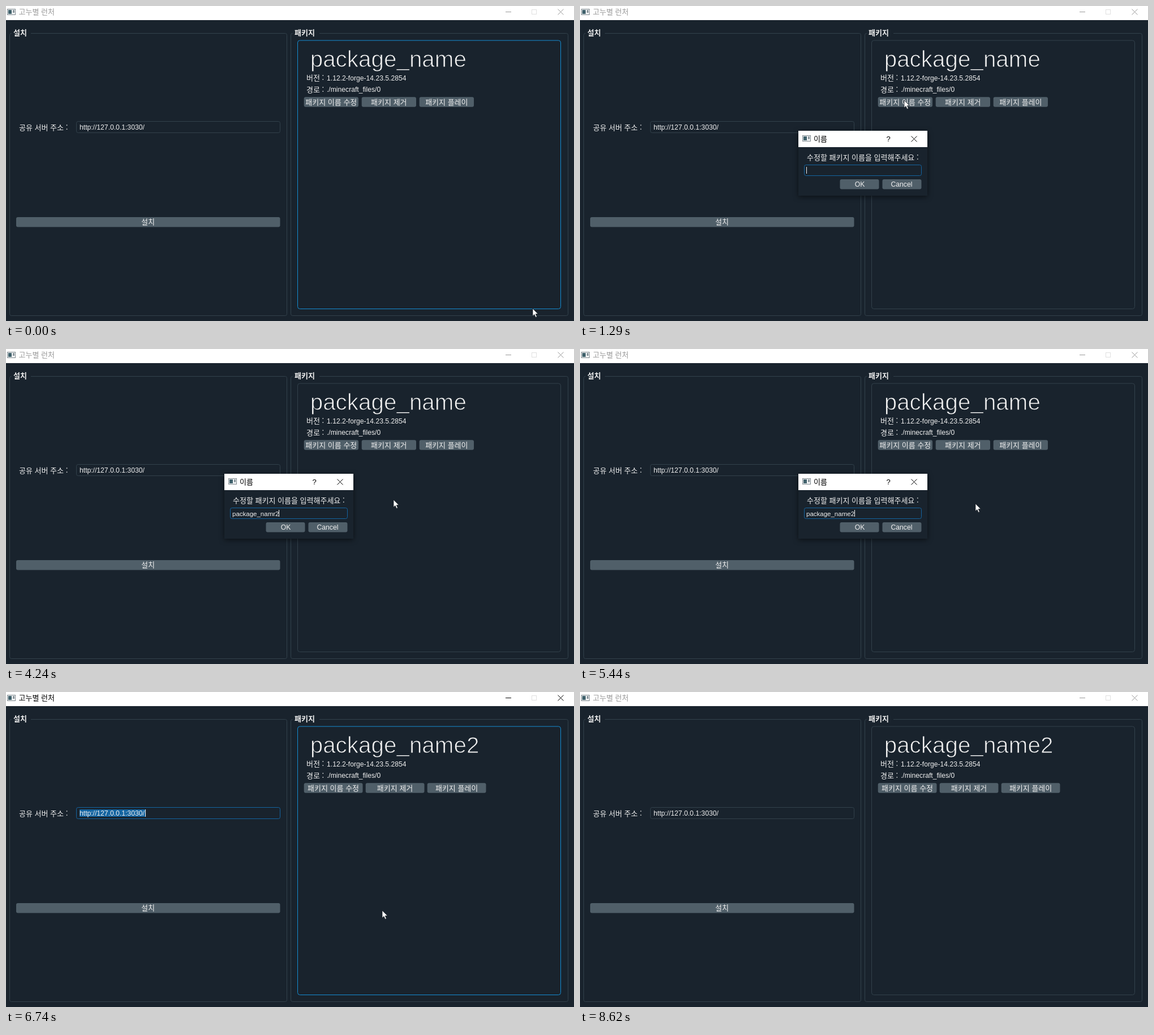
Animation, 1004 px wide and 558 px high, one loop 8.68 s. Source, as an HTML page:

```html
<!DOCTYPE html>
<html lang="ko">
<head>
<meta charset="utf-8">
<title>고누별 런처</title>
<style>
html, body { margin: 0; width: 100%; height: 100%; overflow: hidden; background: #19232d; }
svg { display: block; width: 1004px; height: 558px; }
text { font: 12.15px "Liberation Sans", Arial, sans-serif; fill: #f0f0f0; white-space: pre; }
.ko { font: 300 13px "Noto Sans CJK KR", "Noto Sans CJK", sans-serif; }
.bold { font-weight: 700; }
.mid { text-anchor: middle; }
.dark { fill: #000; }
.name { font-size: 40.4px; stroke: #19232d; stroke-width: 1px; }
.box { fill: none; stroke: #32414b; }
.bg { fill: #19232d; }
.btn { fill: #505f69; }
.btn.hot { stroke: #148cd2; }
.btn.down { fill: #19232d; stroke: #148cd2; }
.list.hot { stroke: #148cd2; }
.focus { stroke: #1464a0; }
.glyph { fill: none; stroke: #000; }
.bar .glyph { stroke: #999; }
.bar text { fill: #999; }
.bar.active .glyph { stroke: #000; }
.bar.active text { fill: #000; }
.bar .off { stroke: #e0e0e0 !important; }
#field { font-size: 11.5px; }
#shade { filter: drop-shadow(0 2px 5px rgba(0, 0, 0, .55)); }
</style>
</head>
<body>
<svg viewBox="0 0 1004 558">
  <defs>
    <g id="icon">
      <rect x=".5" y=".5" width="14" height="10" fill="#f4f6f7" stroke="#7d878d"/>
      <rect x="2" y="2" width="6" height="7" fill="#40616c"/>
      <rect x="10" y="2" width="3" height="5" fill="#8d989e"/>
    </g>
    <path id="cross" d="M0 0L10 10M10 0L0 10"/>
  </defs>

  <rect class="bg" width="1004" height="558"/>
  <g class="bar" id="bar">
    <rect width="1004" height="25" fill="#fff"/>
    <use href="#icon" x="2" y="5"/>
    <text class="ko" x="22.5" y="15">고누별 런처</text>
    <path class="glyph" d="M883 10.5H893"/>
    <rect class="glyph off" x="929.5" y="6.5" width="8" height="8"/>
    <use class="glyph" href="#cross" x="975.5" y="5.5"/>
  </g>

  <rect class="box" x="6.5" y="48.5" width="490" height="500" rx="3"/>
  <rect class="bg" x="10" y="46" width="34" height="5"/>
  <text class="ko bold" x="13" y="52">설치</text>
  <text class="ko" x="23" y="219.5">공유 서버 주소 :</text>
  <rect class="box" id="edit" x="124.5" y="204.5" width="360" height="20" rx="3"/>
  <rect id="sel" x="130" y="208" width="116" height="13" fill="#1464a0"/>
  <text x="130" y="219">http://127.0.0.1:3030/</text>
  <path id="urlCaret" d="M246.5 208V221" stroke="#f0f0f0"/>
  <rect class="btn" x="18" y="374" width="466.5" height="17.5" rx="3"/>
  <text class="ko mid" x="251" y="387">설치</text>

  <rect class="box" x="503.5" y="48.5" width="490" height="500" rx="3"/>
  <rect class="bg" x="507" y="46" width="47" height="5"/>
  <text class="ko bold" x="510" y="52">패키지</text>
  <rect class="box list" id="list" x="515.5" y="61" width="465" height="475.5" rx="4"/>
  <g id="hover">
    <rect x="518" y="63" width="461" height="128" fill="#32414b"/>
    <rect class="bg" x="527" y="72" width="299" height="43"/>
    <rect class="bg" x="527" y="120" width="299" height="15"/>
    <rect class="bg" x="527" y="140" width="299" height="15"/>
  </g>
  <text class="name" x="537.7" y="108">package<tspan dy="-2">_</tspan><tspan dy="2" id="tail">name</tspan></text>
  <text class="ko" x="531" y="132">버전 :</text>
  <text x="567" y="131.5">1.12.2-forge-14.23.5.2854</text>
  <text class="ko" x="531" y="152.5">경로 :</text>
  <text x="567" y="152">./minecraft_files/0</text>
  <g id="narrow"></g>
  <g id="wide"></g>

  <g id="dialog">
    <rect class="bg" id="shade" x="386" y="221" width="228" height="115"/>
    <rect x="386" y="221" width="228" height="29" fill="#fff"/>
    <use href="#icon" x="393" y="229"/>
    <text class="ko dark" x="413" y="239.5">이름</text>
    <text class="dark mid" x="545" y="239.5" style="font-size:13px">?</text>
    <use class="glyph" href="#cross" x="585.5" y="230.5"/>
    <text class="ko" x="401" y="272.5">수정할 패키지 이름을 입력해주세요 :</text>
    <rect class="box focus" x="396.5" y="281.5" width="207" height="19" rx="3"/>
    <text id="field" x="400" y="295.5"></text>
    <rect id="caret" y="285" width="1" height="12" fill="#f0f0f0"/>
    <rect class="btn" id="ok" x="459.5" y="307" width="69" height="17.5" rx="3"/>
    <text class="mid" x="494.5" y="320">OK</text>
    <rect class="btn" x="534.5" y="307" width="69" height="17.5" rx="3"/>
    <text class="mid" x="568.5" y="320">Cancel</text>
  </g>

  <g id="mouse">
    <circle id="click" cx="-.5" r="12" fill="#d2c814" fill-opacity=".75"/>
    <path id="arrow" d="M0 0V13.2L3 10.4L5.2 15.4L7.4 14.4L5.2 9.6H9.4Z" fill="#fff" stroke="#10161c" stroke-width=".7"/>
  </g>
</svg>
<script>
const LOOP = 8680;
const OPEN = 1140, CLOSE = 6210;
const $ = id => document.getElementById(id);
const within = (t, a, b) => t >= a && t < b;
const show = (id, on) => $(id).setAttribute('visibility', on ? 'visible' : 'hidden');

// Row of package buttons: start, pitch and width
function buttonRow(id, x, pitch, width) {
  $(id).innerHTML = ['패키지 이름 수정', '패키지 제거', '패키지 플레이'].map((label, i) => {
    const left = x + i * pitch;
    return `<rect class="btn" x="${left}" y="161.2" width="${width}" height="17.5" rx="3"/>
      <text class="ko mid" x="${left + width / 2}" y="174.5">${label}</text>`;
  }).join('');
}
buttonRow('narrow', 526.7, 102, 96.3);
buttonRow('wide', 526.7, 109, 103.8);
const renameBtn = $('narrow').querySelector('rect');

// Pointer moves: first step, last step, step count, destination
const moves = [
  [70, 770, 10, 573, 167],
  [1370, 1690, 5, 685, 267],
  [5440, 5440, 1, 699, 274],
  [5520, 5980, 7, 494, 313],
  [6290, 6740, 7, 665, 387],
  [6990, 7600, 9, 908, 470],
  [7750, 8150, 6, 922, 562]
];
const clicks = [[910, 1060], [6060, 6210], [6910, 6990]];

// Key presses; "<" is backspace
const keys = [
  [2300, 'p'], [2390, 'a'], [2470, 'c'], [2550, 'k'],
  [3240, 'a'], [3320, 'g'], [3390, 'e'], [3770, '_'],
  [4000, 'n'], [4080, 'a'], [4160, 'm'], [4240, 'r2'],
  [4640, '<'], [4790, '<'], [4960, 'e'], [5110, '2']
];

const ease = p => p * p * (3 - 2 * p);

function pointer(t) {
  let x = 931, y = 536;
  for (const [start, end, steps, tx, ty] of moves) {
    if (t < start) break;
    const gap = (end - start) / Math.max(1, steps - 1) || 1;
    const step = Math.min(steps, Math.floor((t - start) / gap + 1e-6) + 1);
    const p = ease(step / steps);
    x += (tx - x) * p;
    y += (ty - y) * p;
  }
  return [x, y];
}

function typed(t) {
  let s = '';
  for (const [at, key] of keys) {
    if (t >= at) s = key === '<' ? s.slice(0, -1) : s + key;
  }
  return s;
}

function render(t) {
  const [x, y] = pointer(t);
  const modal = within(t, OPEN, CLOSE);
  const renamed = t >= CLOSE;
  const pressed = clicks.some(([a, b]) => within(t, a, b));
  const inList = !modal && x > 515 && x < 981 && y > 61 && y < 538;
  const onItem = inList && t < OPEN && y < 191;
  const onRename = onItem && x > 527 && x < 623 && y > 160 && y < 180;
  const onOk = modal && x > 459 && x < 529 && y > 307 && y < 325;
  const editing = within(t, CLOSE, 6910);

  $('bar').classList.toggle('active', within(t, 910, OPEN) || within(t, CLOSE, 8620));
  $('list').classList.toggle('hot', inList);
  $('edit').classList.toggle('focus', editing);
  show('sel', editing);
  show('urlCaret', editing);
  show('hover', onItem);
  show('narrow', !renamed);
  show('wide', renamed);
  $('tail').textContent = renamed ? 'name2' : 'name';
  renameBtn.classList.toggle('hot', onRename);
  renameBtn.classList.toggle('down', onRename && pressed);

  $('dialog').style.display = modal ? '' : 'none';
  if (modal) {
    $('dialog').style.opacity = t < 1210 ? .6 : 1;
    $('field').textContent = typed(t);
    $('caret').setAttribute('x', 400 + Math.round($('field').getComputedTextLength()));
    show('caret', !within(t, 2070, 2300) && !within(t, 3160, 3240));
    $('ok').classList.toggle('hot', onOk);
    $('ok').classList.toggle('down', onOk && pressed);
  } else {
    show('caret', false);
  }

  $('mouse').setAttribute('transform', `translate(${Math.round(x)} ${Math.round(y)})`);
  $('arrow').setAttribute('fill', pressed ? '#fffbb4' : '#fff');
  show('click', pressed);
}

const began = performance.now();
function frame() {
  render((performance.now() - began) % LOOP);
  requestAnimationFrame(frame);
}
frame();
</script>
</body>
</html>
```
